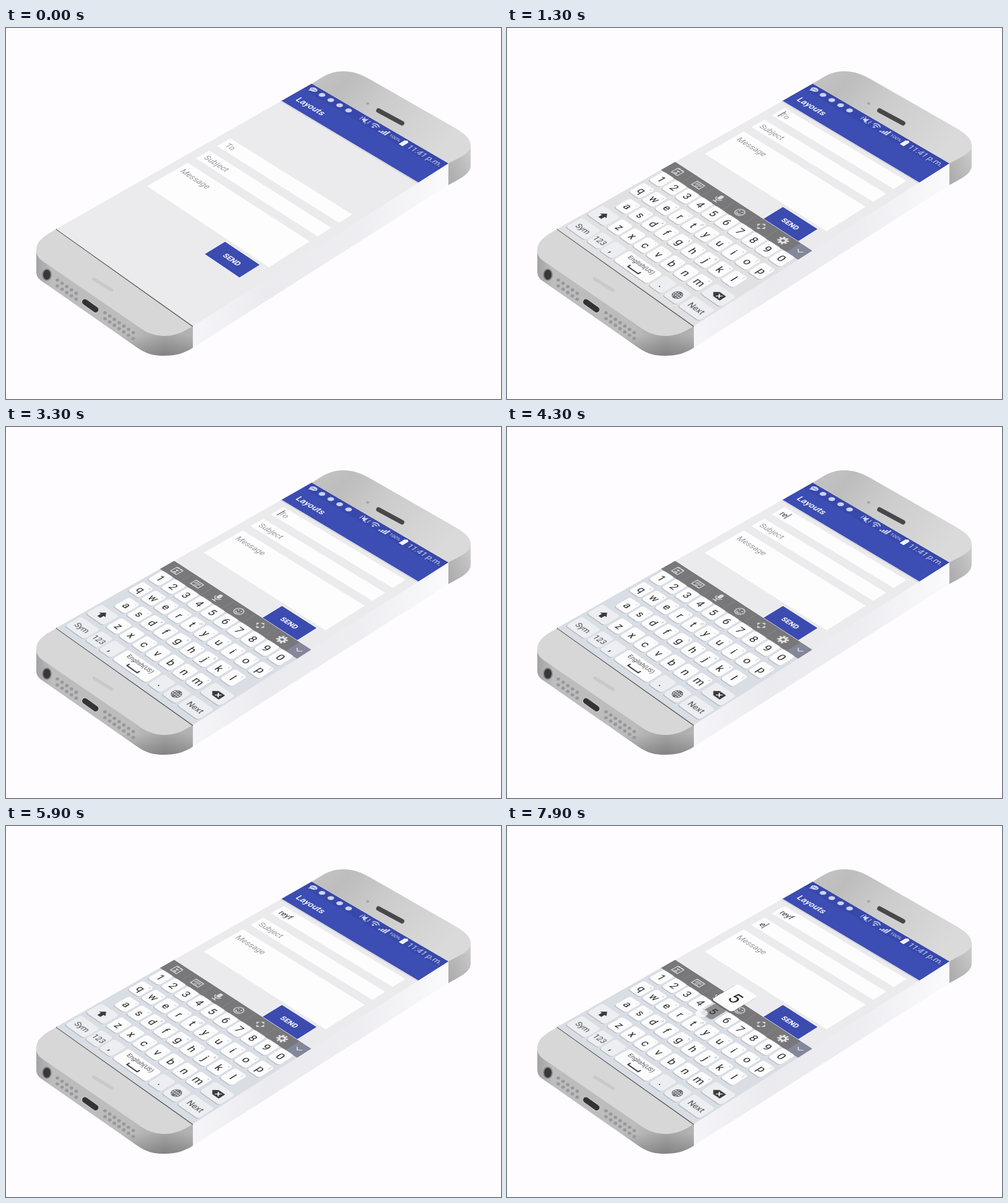
These frames come from a looping animation (800 by 600 pixels, 8000 ms). An HTML page:

```html
<!DOCTYPE html>
<html lang="en">
<head>
<meta charset="utf-8">
<title>Phone form</title>
<style>
html, body { margin: 0; width: 100%; height: 100%; overflow: hidden; background: #fefcff; }
svg { position: absolute; left: 0; top: 0; }
/* A clear margin of 4px keeps the slanted edges smooth */
#screen {
  left: -4px;
  top: -4px;
  font-family: Roboto, "Noto Sans", sans-serif;
  transform-origin: 4px 4px;
  transform: matrix3d(.51394, .32772, 0, -.00013979, -.65722, .31943, 0, -.00014694, 0, 0, 1, 0, 494, 90, 0, 1);
}
</style>
</head>
<body>
<svg id="body" width="800" height="600">
  <defs>
    <linearGradient id="cap" x1="0" y1="0" x2="1" y2=".5">
      <stop offset="0" stop-color="#c4c4c4"/><stop offset=".22" stop-color="#bdbdbd"/>
      <stop offset=".5" stop-color="#cccccc"/><stop offset="1" stop-color="#dadada"/>
    </linearGradient>
    <linearGradient id="capSide" x1="0" y1="1" x2="1" y2="0">
      <stop offset="0" stop-color="#a9a9aa"/><stop offset=".6" stop-color="#bebebf"/><stop offset="1" stop-color="#cfcfd0"/>
    </linearGradient>
    <linearGradient id="chin">
      <stop offset="0" stop-color="#a2a2a3"/><stop offset=".1" stop-color="#bdbdbe"/><stop offset=".62" stop-color="#bcbcbd"/>
      <stop offset=".82" stop-color="#a6a6a7"/><stop offset="1" stop-color="#b4b4b5"/>
    </linearGradient>
    <linearGradient id="shade" x2="0" y2="1">
      <stop offset=".8" stop-opacity="0"/><stop offset="1" stop-opacity=".22"/>
    </linearGradient>
    <linearGradient id="edge">
      <stop offset="0" stop-color="#f5f4f8"/><stop offset=".3" stop-color="#ebeaef"/>
      <stop offset=".65" stop-color="#eeedf2"/><stop offset="1" stop-color="#fafafc"/>
    </linearGradient>
  </defs>
  <path fill="url(#edge)" d="M302 481V517L715 254V218Z"/>
  <path fill="url(#capSide)" d="M751 188V222C751 236 735 243 715 254V217Z"/>
  <path fill="url(#cap)" d="M494 90C512 79 524 70 545 70C562 70 574 75 590 84L728 163C745 173 751 181 751 190C751 203 733 209 715 219Z"/>
  <path stroke="#48484b" stroke-width="7.5" stroke-linecap="round" d="M602 133.500L640 154"/>
  <ellipse cx="584.500" cy="122" rx="2.600" ry="2" fill="#a5a5a6"/>
  <g id="front"></g>
  <path fill="#d7d7d7" d="M82 325C64 335 49 343 49 360C49 372 58 376 68 383L205 477C222 489 232 497 255 498C275 498 288 491 302 482Z"/>
  <path stroke="#555557" stroke-width="2" d="M81 325L302 482.500"/>
  <path stroke="#c9c9ca" stroke-width="5.500" stroke-linecap="round" d="M142 406L171 424"/>
  <ellipse cx="66" cy="399" rx="8" ry="10" fill="#8b8b8c"/>
  <ellipse cx="66" cy="399" rx="6" ry="8" fill="#38383a"/>
  <path stroke="#d0d0d1" stroke-width="11" stroke-linecap="round" d="M127.500 443L145 455.500"/>
  <path stroke="#333335" stroke-width="9" stroke-linecap="round" d="M127.500 443L145 455.500"/>
  <g id="holes" fill="#98989a"></g>
</svg>
<svg id="screen" width="368" height="648" viewBox="-4 -4 368 648"></svg>
<script>
const LOOP = 8000, FOCUS = 1000, HOLD = 200;
const presses = [['r', 3700], ['e', 4000], ['y', 4700], ['f', 5100], ['Next', 6500], ['e', 7400], ['5', 7800]];
const $ = id => document.getElementById(id);

const rect = (x, y, w, h, fill, more = '') => `<rect x="${x}" y="${y}" width="${w}" height="${h}" fill="${fill}" ${more}/>`;
const text = (x, y, size, fill, str, more = '') =>
  `<text x="${x}" y="${y}" font-size="${size}" fill="${fill}" ${more}>${str.replace(/&/g, '&amp;').replace(/</g, '&lt;')}</text>`;
const line = (d, width = 1.8, color = '#dcdcde') =>
  `<path d="${d}" fill="none" stroke="${color}" stroke-width="${width}"/>`;
const dot = (x, y, r, fill, more = '') => `<circle cx="${x}" cy="${y}" r="${r}" fill="${fill}" ${more}/>`;
const mid = 'text-anchor="middle"';

function holeRow(x, y, count) {
  let out = '';
  for (let i = 0; i < count; i++)
    for (const dy of [0, 9.5])
      out += `<ellipse cx="${x + i * 7.6}" cy="${y + dy + i * 5.35}" rx="2.900" ry="2.600"/>`;
  return out;
}
$('holes').innerHTML = holeRow(83, 407.5, 5) + holeRow(160, 460.5, 7);
$('front').innerHTML = ['chin', 'shade'].map(id =>
  `<path fill="url(#${id})" d="M49 358V394C49 405 56 408 66 415L205 512C222 524 232 530 255 530C275 530 288 526 302 517V480Z"/>`).join('');

// Keys: name -> centre and width
const keys = {};
const addKey = (name, x, y, w = 30, hint = '', plain = false) => { keys[name] = { x, y, w, hint, plain }; };
const addRow = (names, x, y, hints = '') =>
  [...names].forEach((n, i) => addKey(n, x + i * 35, y, 30, hints[i]));
addRow('1234567890', 22, 413.5);
addRow('qwertyuiop', 22, 461.5, '+×÷=@_<>[]');
addRow('asdfghjkl', 39, 509.5, '!/#~%^&*(');
addRow('zxcvbnm', 74, 558, '-\'":;,?');
[['shift', 29, 558, 48], ['back', 331, 558, 50], ['Sym', 32, 607, 52], ['123', 78, 607, 32],
 [',', 114, 607, 32], ['space', 179, 607, 88], ['.', 244, 607, 32], ['globe', 282, 607, 34],
 ['Next', 330, 607, 53]].forEach(([n, x, y, w]) => addKey(n, x, y, w, '', n !== 'space'));

const glyphs = {
  shift: (x, y) => `<path d="M${x} ${y - 9}l9 9h-5v8h-8v-8h-5z" fill="#3a3a3d"/>`,
  back: (x, y) => `<path d="M${x - 12} ${y}l8-7.500h16v15h-16z" fill="#3a3a3d"/>` +
    line(`M${x - 1} ${y - 4}l8 8m0-8l-8 8`, 2, '#fff'),
  space: (x, y) => text(x, y - 4, 12.5, '#4a4a4e', 'English(US)', mid) + line(`M${x - 13} ${y + 5}v6h27v-6`, 2.6, '#333336'),
  globe: (x, y) => line(`M${x - 9} ${y}a9 9 0 1 0 18 0a9 9 0 1 0-18 0h18M${x} ${y - 9}v18M${x - 7.5} ${y - 4.5}h15m0 9h-15` +
    `M${x} ${y - 9}q-9 9 0 18q9-9 0-18`, 1.3, '#55555a')
};

function drawKey(name) {
  const { x, y, w, hint, plain } = keys[name];
  const box = (dy, fill, more = '') => rect(x - w / 2, y - 19 + dy, w, 37, fill, `rx="5" ${more}`);
  const long = name.length > 1;
  return box(2, '#b4b9c2') + box(0, plain ? '#eceef2' : '#fcfcfd', `id="key-${name}"`) +
    (glyphs[name] ? glyphs[name](x, y)
      : text(x, y + (long ? 6 : 8), long ? 17 : 22.5, long ? '#4a4a4e' : '#232326', name, mid)) +
    (hint ? text(x + 10, y - 10, 8, '#a4a4a8', hint, mid) : '');
}

function toolbar() {
  let out = rect(0, 360, 360, 35, '#78787b') + rect(331, 360, 29, 35, '#84879a');
  for (let i = 1; i < 6; i++) out += rect(i * 55.5 - 2, 364, 1, 27, '#89898c');
  const y = 377, x = i => 26 + i * 55.6;
  out += line(`M18 369h16v16h-16zM22 367v4m8-4v4M22 375h8m-4 0v7m4 0h-8`);
  out += line(`M${x(1) - 10} 370h20v14h-20z`) + line(`M${x(1) - 7} 374h14m-14 3h14m-11 4h8`, 1.6);
  out += rect(x(2) - 4, 366, 8, 13, '#dcdcde', 'rx="4"') + line(`M${x(2) - 7} 375a7 7 0 0 0 14 0m-7 7v5m-5 0h10`);
  out += line(`M${x(3) - 9} ${y}a9 9 0 1 0 18 0a9 9 0 1 0-18 0m4 2q5 7 10 0`) + dot(x(3) - 3.5, 374, 1.6, '#dcdcde') + dot(x(3) + 3.5, 374, 1.6, '#dcdcde');
  for (const a of [0, 90, 180, 270])
    out += `<path d="M-4.500-5.500L0-10L4.500-5.500z" fill="#dcdcde" transform="translate(${x(4)} ${y}) rotate(${a})"/>`;
  out += `<circle cx="${x(5)}" cy="${y}" r="8.500" fill="none" stroke="#e4e4e6" stroke-width="4" stroke-dasharray="3.600 3.075"/>` +
    `<circle cx="${x(5)}" cy="${y}" r="5.300" fill="none" stroke="#e4e4e6" stroke-width="4"/>`;
  return out + line('M339 374l6.500 6l6.500-6', 2);
}

function statusBar() {
  const c = '#ccd3f3';
  let out = rect(0, 0, 360, 25, '#3848aa');
  out += `<ellipse cx="17" cy="11.500" rx="8.500" ry="6.500" fill="${c}"/><path d="M11 15v6l7-4z" fill="${c}"/>`;
  for (const dx of [-4, 0, 4]) out += dot(17 + dx, 11.5, 1.2, '#3848aa');
  for (let i = 0; i < 4; i++) out += dot(41 + i * 24, 12.5, 6.5, c);
  out += `<path d="M151 10h4l5-5v16l-5-5h-4z" fill="${c}"/>` + line('M149 5l16 16M147 7v11M167 7v11', 1.5, c);
  out += line('M174 10q9-8 18 0M177 14q6-5 12 0', 2.2, c) + dot(183, 18, 2.4, c);
  for (let i = 0; i < 4; i++) out += rect(199 + i * 5, 17 - i * 4, 3.6, 4 + i * 4, c);
  out += text(222, 17, 11.5, c, '100%') + rect(254, 5, 10, 17, '#f0f2fc', 'rx="1"') + rect(257, 3, 4, 2, '#f0f2fc');
  return out + text(271, 20, 18, c, '11:41 p.m.');
}

function form() {
  const white = '#fdfdfe', hint = '#98989b';
  return rect(20, 236, 320, 34, white) + rect(20, 290, 320, 34, white) + rect(20, 344, 320, 100, white) +
    text(29, 260, 18, hint, 'To', 'id="in0"') + text(29, 314, 18, hint, 'Subject', 'id="in1"') +
    text(29, 373, 18, hint, 'Message') +
    rect(0, 242, 1.8, 22, '#50556f', 'id="caret"') +
    rect(236, 451, 88, 48, '#3b4bb0') + text(280, 481, 15.5, '#fff', 'SEND', mid + ' font-weight="700"');
}

$('screen').innerHTML =
  `<defs><linearGradient id="drop" x2="0" y2="1"><stop stop-color="#000" stop-opacity=".14"/><stop offset="1" stop-color="#000" stop-opacity="0"/></linearGradient>` +
  `<clipPath id="glass">${rect(0, 0, 360, 640, '#000')}</clipPath></defs><g clip-path="url(#glass)">` +
  rect(0, 0, 360, 640, '#ebebee') + `<g id="form">${form()}</g>` +
  rect(0, 82, 360, 5, 'url(#drop)') + rect(0, 25, 360, 57, '#3c4db3') +
  text(16.5, 62, 20.5, '#fff', 'Layouts', 'font-weight="500"') + statusBar() +
  rect(0, 360, 360, 280, '#fafbfd', 'id="blank"') +
  `<g id="board">${rect(0, 360, 360, 280, '#d9dde4', 'id="tray"')}${toolbar()}${Object.keys(keys).map(drawKey).join('')}</g>` +
  dot(0, 0, 11, '#fff', 'id="touch" opacity=".75"') +
  `<g id="popup">${rect(-29, -30, 54, 67, '#000', 'rx="7" opacity=".16"')}${rect(-28, -32, 52, 65, '#fcfcfd', 'rx="6"')}` +
  `${text(0, 13, 37, '#232326', '', mid + ' id="big"')}</g></g>`;

const inputs = [$('in0'), $('in1')], hints = ['To', 'Subject'];
const show = (el, on) => el.setAttribute('visibility', on ? 'visible' : 'hidden');
const move = (el, x, y) => el.setAttribute('transform', `translate(${x} ${y})`);
const clamp = v => Math.min(1, Math.max(0, v));

function draw(now) {
  const t = now % LOOP, open = t >= FOCUS;

  // Keyboard slides up while it fades in; the form recentres at once
  const k = clamp((t - FOCUS) / 300), ease = k * k * (3 - 2 * k);
  move($('form'), 0, open ? -140 : 0);
  move($('board'), 0, 140 * (1 - ease));
  $('board').setAttribute('opacity', clamp(k * 1.1));
  show($('blank'), open);
  const tint = clamp((t - 1300) / 500), mix = (a, b) => Math.round(a + (b - a) * tint);
  $('tray').setAttribute('fill', `rgb(${mix(225, 217)},${mix(225, 221)},${mix(227, 228)})`);

  // Typed text
  const typed = ['', ''];
  let focus = 0, last = FOCUS, held = null;
  for (const [key, at] of presses) {
    if (t >= at + HOLD) {
      if (key === 'Next') focus = 1; else typed[focus] += key;
      last = at + HOLD;
    } else if (t >= at) held = key;
  }
  inputs.forEach((el, i) => {
    el.textContent = typed[i] || hints[i];
    el.setAttribute('fill', typed[i] ? '#2a2a2d' : '#98989b');
  });
  $('caret').setAttribute('x', 29 + (typed[focus] ? inputs[focus].getComputedTextLength() + 1 : 0));
  $('caret').setAttribute('y', 242 + focus * 54);
  show($('caret'), open && (t - last) % 1000 < 500);

  // Pressed key with its touch spot and popup
  for (const [key] of presses)
    $('key-' + key).setAttribute('fill', key === held ? '#8d8d90' : keys[key].plain ? '#eceef2' : '#fcfcfd');
  const pop = held && held !== 'Next';
  show($('popup'), pop);
  show($('touch'), held);
  if (held) {
    const { x, y } = keys[held];
    $('big').textContent = held;
    move($('popup'), x, y - 55);
    move($('touch'), x - 11, y + 18);
  }
  requestAnimationFrame(draw);
}
draw(performance.now());
</script>
</body>
</html>
```
